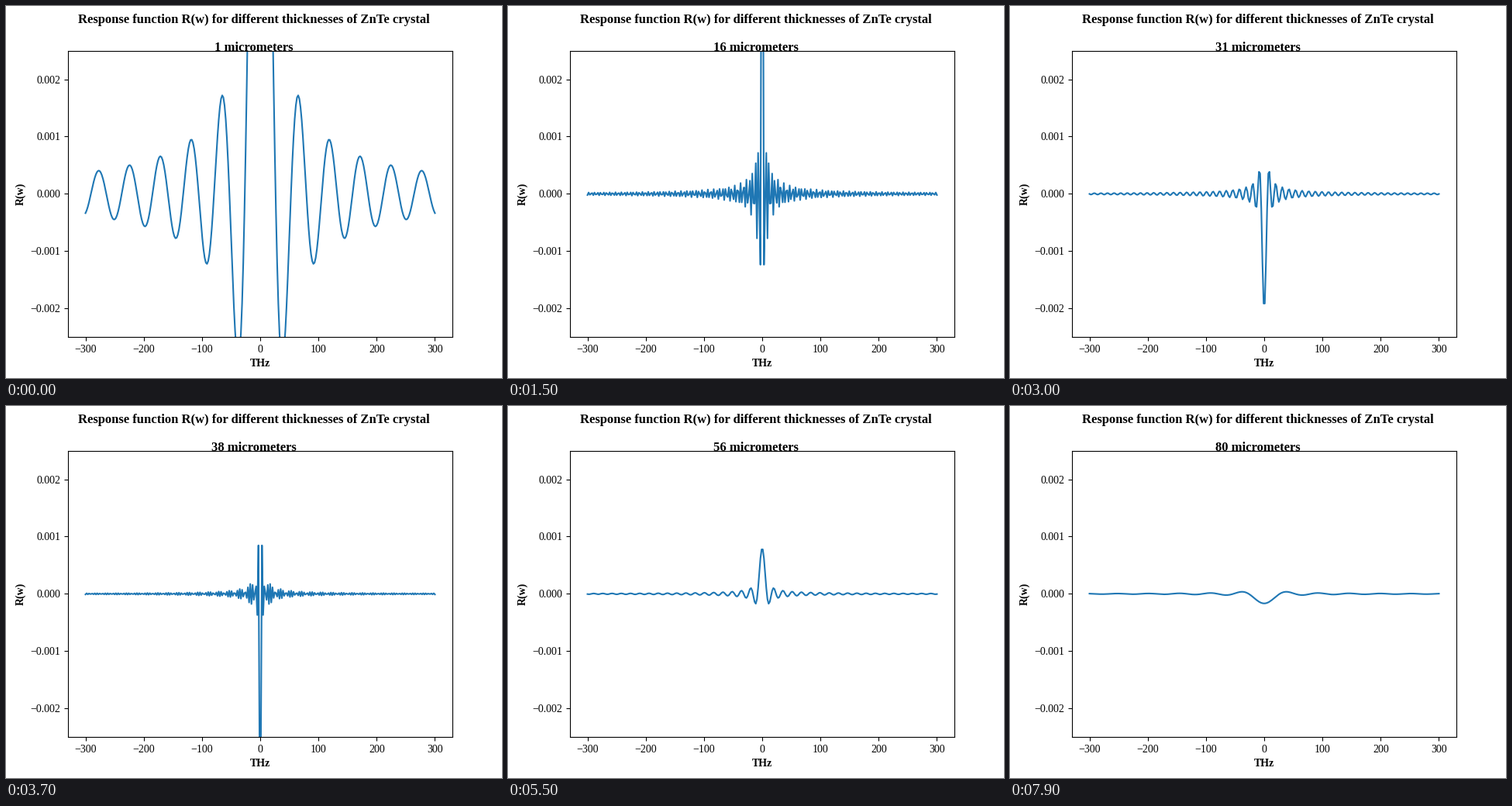
A matplotlib script for the animation above (8 s loop, 640 by 480 pixels).

```python
import numpy as np
import matplotlib.pyplot as plt
from matplotlib.animation import FuncAnimation

plt.rcParams["font.family"] = "Liberation Serif"

TITLE = "Response function R(w) for different thicknesses of ZnTe crystal"
PEAK = 0.0134       # response at zero frequency
DELAY = 0.018923    # phase mismatch in ps per micrometer
COUNT = 80

freq = np.linspace(-300, 300, 300)  # coarse sampling, so thick crystals alias


def response(thickness):
    return PEAK * np.sinc(2 * freq * DELAY * thickness)


fig, ax = plt.subplots(figsize=(6.4, 4.8), dpi=100)
line, = ax.plot(freq, response(1))
ax.set_xlim(-330, 330)
ax.set_ylim(-0.0025, 0.0025)
ax.set_yticks(np.arange(-2, 3) * 0.001)
ax.set_xlabel("THz", weight="bold")
ax.set_ylabel("R(w)", weight="bold")
title = fig.suptitle("", fontsize=12, weight="bold")


def update(i):
    thickness = i + 1
    line.set_ydata(response(thickness))
    title.set_text(f"{TITLE}\n\n{thickness} micrometers")
    return line, title


anim = FuncAnimation(fig, update, frames=COUNT, interval=100,
                     repeat=True, repeat_delay=0)
plt.show()
```
